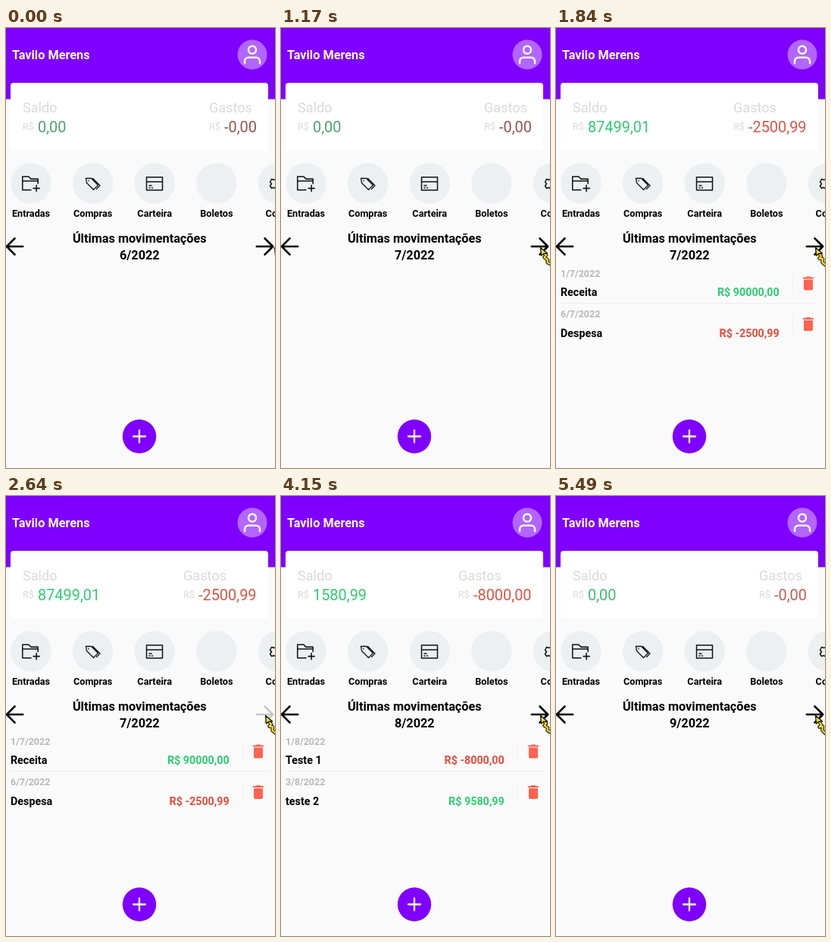
Animation of 355x578 px, one loop 5.62 s. Source, as an HTML page with a canvas:

```html
<!DOCTYPE html>
<html lang="pt">
<head>
<meta charset="utf-8">
<style>
  html, body { margin: 0; width: 100%; height: 100%; overflow: hidden; background: #fafafa; }
  canvas { display: block; }
</style>
</head>
<body>
<canvas id="stage" width="355" height="578"></canvas>
<script>
const ctx = document.getElementById('stage').getContext('2d');
const LOOP = 5620;
const PURPLE = '#7f00ff', GREEN = '#2ecc71', RED = '#e74c3c';

// Active periods of the screen: start, end, number of repaints.
const SPANS = [
  [70, 610, 8], [760, 1300, 8], [1360, 1840, 8], [2320, 2640, 5], [2900, 3460, 9],
  [3530, 3670, 3], [4150, 4480, 6], [4740, 5290, 9], [5360, 5490, 3]
];
const TAPS = [{ down: 460, up: 760 }, { down: 2490, up: 2900 }, { down: 4330, up: 4740 }];
const SLIDE = 230;

const PAGES = [
  { from: 0, saldo: '0,00', gastos: '-0,00', x: 268, green: '#4fa073', red: '#93534e', rows: [] },
  { from: 1290, saldo: '87499,01', gastos: '-2500,99', x: 234, green: GREEN, red: '#dc5545', rows: [
    { date: '1/7/2022', name: 'Receita', value: 'R$ 90000,00', color: GREEN, start: 1358 },
    { date: '6/7/2022', name: 'Despesa', value: 'R$ -2500,99', color: RED, start: 1400 }
  ] },
  { from: 3230, saldo: '1580,99', gastos: '-8000,00', x: 234, green: GREEN, red: '#dc5545', rows: [
    { date: '1/8/2022', name: 'Teste 1', value: 'R$ -8000,00', color: RED, start: 3230 },
    { date: '3/8/2022', name: 'teste 2', value: 'R$ 9580,99', color: GREEN, start: 3230 }
  ] },
  { from: 5090, saldo: '0,00', gastos: '-0,00', x: 268, green: '#42b973', red: '#cc5a4e', rows: [] }
];

const clamp = v => Math.max(0, Math.min(1, v));
const ease = v => { v = clamp(v); return v < .5 ? 2 * v * v : 1 - 2 * (1 - v) ** 2; };

function repaintTime(t) {
  let held = 0;
  for (const [a, b, n] of SPANS) {
    if (t < a) break;
    const step = (b - a) / (n - 1);
    held = a + step * Math.min(n - 1, Math.floor((t - a) / step + .15));
  }
  return held;
}

function text(s, x, y, size, color, bold = true, align = 'left') {
  ctx.font = `${bold ? 700 : 400} ${size}px Roboto, sans-serif`;
  ctx.textAlign = align;
  ctx.fillStyle = color;
  ctx.fillText(s, x, y);
}

function disc(x, y, r, color) {
  ctx.fillStyle = color;
  ctx.beginPath();
  ctx.arc(x, y, r, 0, 7);
  ctx.fill();
}

function icon(d, x, y, scale, color, width) {
  ctx.save();
  ctx.translate(x, y);
  ctx.scale(scale, scale);
  ctx.translate(-12, -12);
  ctx.lineCap = ctx.lineJoin = 'round';
  const path = new Path2D(d);
  if (width) {
    ctx.strokeStyle = color;
    ctx.lineWidth = width;
    ctx.stroke(path);
  } else {
    ctx.fillStyle = color;
    ctx.fill(path);
  }
  ctx.restore();
}

const ICON = {
  user: 'M20 21v-2a4 4 0 0 0-4-4H8a4 4 0 0 0-4 4v2M16 7a4 4 0 1 1-8 0a4 4 0 1 1 8 0',
  left: 'M19 12H5M12 19l-7-7 7-7',
  right: 'M5 12h14M12 5l7 7-7 7',
  plus: 'M12 4v16M4 12h16',
  trash: 'M6 19c0 1.1.9 2 2 2h8c1.1 0 2-.9 2-2V7H6zM19 4h-3.5l-1-1h-5l-1 1H5v2h14z',
  folder: 'M12 20H1V3h8l3 3h9v6M1 8.500h20M19 14v8M15 18h8',
  tags: 'M3 5l7 0 9 9-6 6-9-9zM12 5l9.500 9.500-4.500 4.500M6.500 8v.5',
  card: 'M1.500 3.500h21v17h-21zM1.500 9.500h21M5 14.500h3M5 17.500h1M8.500 17.500h1',
  gear: 'M10 3h4l1 3 3 1 3-1 2 4-2 2 2 3-2 3-3-1-3 2-1 2h-4l-1-2-3-2-3 1-2-3 2-3-2-2 2-4 3 1 3-1z'
};

function drawHeader() {
  ctx.fillStyle = '#fafafa';
  ctx.fillRect(0, 0, 355, 578);
  ctx.fillStyle = PURPLE;
  ctx.fillRect(0, 0, 355, 93.500);
  text('Tavilo Merens', 8, 41, 16.270, '#fff');
  disc(325, 35, 19.500, '#b266ff');
  icon(ICON.user, 325, 35, 1.25, '#fff', 2);
}

function drawBalance(page) {
  ctx.fillStyle = '#fff';
  ctx.beginPath();
  ctx.roundRect(6, 72, 340, 89, 4);
  ctx.fill();
  const column = (x, title, value, color) => {
    text(title, x, 111, 18.1, '#dadada', false);
    text('R$', x, 134, 12.660, '#dadada', false);
    text(value, x + 20, 137, 19.9, color, false);
  };
  column(22, 'Saldo', page.saldo, page.green);
  column(page.x, 'Gastos', page.gastos, page.red);
}

function drawMenu() {
  ['Entradas', 'Compras', 'Carteira', 'Boletos', 'Conta'].forEach((label, i) => {
    const x = 33 + i * 81.600;
    disc(x, 204, 26.700, '#ecf0f1');
    text(label, x, 248, 12.660, '#000', true, 'center');
  });
  icon(ICON.folder, 33, 204.500, 1.02, '#111', 1.5);
  icon(ICON.tags, 114.500, 204.500, 1, '#111', 1.3);
  icon(ICON.card, 196, 204.500, 1, '#111', 1.5);
  icon(ICON.gear, 359.500, 204.500, 1, '#111', 1.5);
}

function arrowAlpha(t) {
  let alpha = 1;
  for (const { down, up } of TAPS) {
    if (t >= up) alpha = .2 + .8 * ease((t - up) / 250);
    else if (t >= down) alpha = 1 - .8 * ease((t - down) / 150);
  }
  return alpha;
}

function drawMonth(t) {
  const month = 6 + TAPS.filter(tap => t >= tap.up + 65).length;
  text('Últimas movimentações', 176.300, 282, 16.270, '#000', true, 'center');
  text(month + '/2022', 176.300, 304, 16.270, '#000', true, 'center');
  icon(ICON.left, 11.500, 287, 1.52, '#000', 1.8);
  ctx.globalAlpha = arrowAlpha(t);
  icon(ICON.right, 341.500, 287, 1.52, '#000', 1.8);
  ctx.globalAlpha = 1;
}

function drawRows(rows, t) {
  rows.forEach((row, i) => {
    const y = i * 53.500;
    const shift = 50 * (1 - ease((t - row.start) / SLIDE));
    text(row.date, 6, 326.500 + y, 12.500, '#b9b9b9');
    text(row.name, 6, 352 + y, 14.300, '#000');
    text(row.value, 294.700 + shift, 352 + y, 14.300, row.color, true, 'right');
    ctx.fillStyle = '#f1f1f1';
    ctx.fillRect(312, 323 + y, 1, 24);
    icon(ICON.trash, 333, 335.500 + y, 1, '#ff6350');
  });
  if (rows.length) {
    ctx.fillStyle = '#ececec';
    ctx.fillRect(6, 361, 340, 1);
  }
}

function cursorAt(t) {
  const keys = [[0, 354, 288], [220, 349, 272], [520, 345, 284], [800, 345, 284], [1050, 342, 288]];
  const i = keys.findIndex(k => k[0] > t);
  if (i < 0) return keys[keys.length - 1].slice(1);
  const a = keys[i - 1], b = keys[i], p = ease((t - a[0]) / (b[0] - a[0]));
  return [a[1] + (b[1] - a[1]) * p, a[2] + (b[2] - a[2]) * p];
}

function drawCursor(t) {
  const [x, y] = cursorAt(t), sway = Math.sin(t / 95) * 1.5;
  ctx.save();
  ctx.translate(x, y);
  ctx.lineJoin = ctx.lineCap = 'round';
  const tail = new Path2D(`M5 8L8 ${11 + sway}L5.5 ${14 + sway}L10 ${16 - sway}L9.5 20L14 ${23 + sway}`);
  for (const [color, width] of [['#111', 4.5], ['#f8d321', 2.4]]) {
    ctx.strokeStyle = color;
    ctx.lineWidth = width;
    ctx.stroke(tail);
  }
  const head = new Path2D('M.5 .5L1.500 11L4.500 8.500L9.500 8Z');
  ctx.fillStyle = '#f8df28';
  ctx.strokeStyle = '#111';
  ctx.lineWidth = 1.3;
  ctx.fill(head);
  ctx.stroke(head);
  ctx.restore();
}

function render(now) {
  const t = repaintTime(now % LOOP);
  const page = PAGES.filter(p => t >= p.from).pop();
  drawHeader();
  drawBalance(page);
  drawMenu();
  drawMonth(t);
  drawRows(page.rows, t);
  disc(176, 536.500, 22.200, PURPLE);
  icon(ICON.plus, 176, 536.500, 1, '#fff', 2.3);
  drawCursor(t);
}

const began = performance.now();
function tick() {
  render(performance.now() - began);
  requestAnimationFrame(tick);
}
tick();
</script>
</body>
</html>
```
